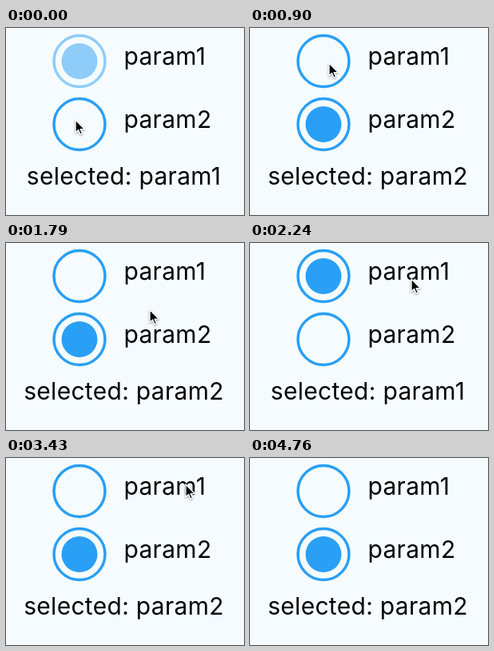
These frames come from a looping animation (298 by 234 pixels, 5350 ms). An HTML page:

```html
<!DOCTYPE html>
<html lang="en">
<head>
<meta charset="utf-8">
<title>Radio buttons</title>
<style>
  html, body { margin: 0; width: 100%; height: 100%; overflow: hidden; background: #f5fbff; }
  svg { display: block; width: 298px; height: 234px; }
  text { font: 30px Inter, Roboto, sans-serif; letter-spacing: .01em; fill: #000; }
  .ring { fill: none; stroke: #299ff5; stroke-width: 3.5; }
  .dot { fill: #299ff5; }
  #cursor { stroke: #fff; stroke-width: 1.4; stroke-linejoin: round; filter: drop-shadow(0 1px 1px #0006); }
</style>
</head>
<body>
<svg viewBox="0 0 298 234">
  <g class="radio">
    <circle class="ring" cx="92" cy="41.5" r="32"/>
    <circle class="dot" cx="92" cy="41.5" r="22.5"/>
  </g>
  <g class="radio">
    <circle class="ring" cx="92" cy="120.5" r="32"/>
    <circle class="dot" cx="92" cy="120.5" r="22.5"/>
  </g>
  <text x="147.5" y="45.5">param1</text>
  <text x="147.5" y="124.5">param2</text>
  <text id="status" x="147.5" y="195.5" text-anchor="middle"></text>
  <path id="cursor" d="M0 0V16L3.6 12.6 6 18.2 8.6 17.1 6.2 11.6H11.4Z"/>
</svg>
<script>
  const LOOP = 5350, STEP = 148.75, LAST = 32;

  // Places the pointer eases between: [step, x, y]
  const stops = [
    [0, 87, 115], [3, 88, 120], [6, 99, 44], [9, 158, 122], [15, 202, 45],
    [18, 210, 112], [23, 225, 33], [29, 221, 106], [32, 210, 260]
  ];
  // Steps of the taps, which alternate between the two options;
  // the first few land on the circles and dim them briefly
  const taps = [-1, 2, 7, 11, 14, 18, 25, 30];
  const CIRCLE_TAPS = 3, DIM_STEPS = 2;

  const radios = [...document.querySelectorAll('.radio')];
  const status = document.getElementById('status');
  const cursor = document.getElementById('cursor');

  const ease = k => k * k * (3 - 2 * k);

  function pointerAt(step) {
    const i = Math.max(1, stops.findIndex(s => s[0] >= step));
    const [s0, x0, y0] = stops[i - 1], [s1, x1, y1] = stops[i];
    const k = ease((step - s0) / (s1 - s0));
    return [x0 + (x1 - x0) * k, y0 + (y1 - y0) * k];
  }

  function draw(time) {
    const step = Math.min(LAST, Math.floor((time % LOOP + 3) / STEP));
    const tap = taps.filter(s => s <= step).length - 1;
    const selected = tap % 2;
    const dimmed = tap < CIRCLE_TAPS && step - taps[tap] < DIM_STEPS;
    radios.forEach((radio, i) => {
      const on = i === selected;
      radio.setAttribute('opacity', on && dimmed ? .5 : 1);
      radio.lastElementChild.setAttribute('visibility', on ? 'visible' : 'hidden');
    });
    status.textContent = `selected: param${selected + 1}`;
    cursor.setAttribute('transform', `translate(${pointerAt(step)})`);
  }

  let start;
  function tick(now) {
    start ??= now;
    draw(now - start);
    requestAnimationFrame(tick);
  }
  draw(0);
  requestAnimationFrame(tick);
</script>
</body>
</html>
```
